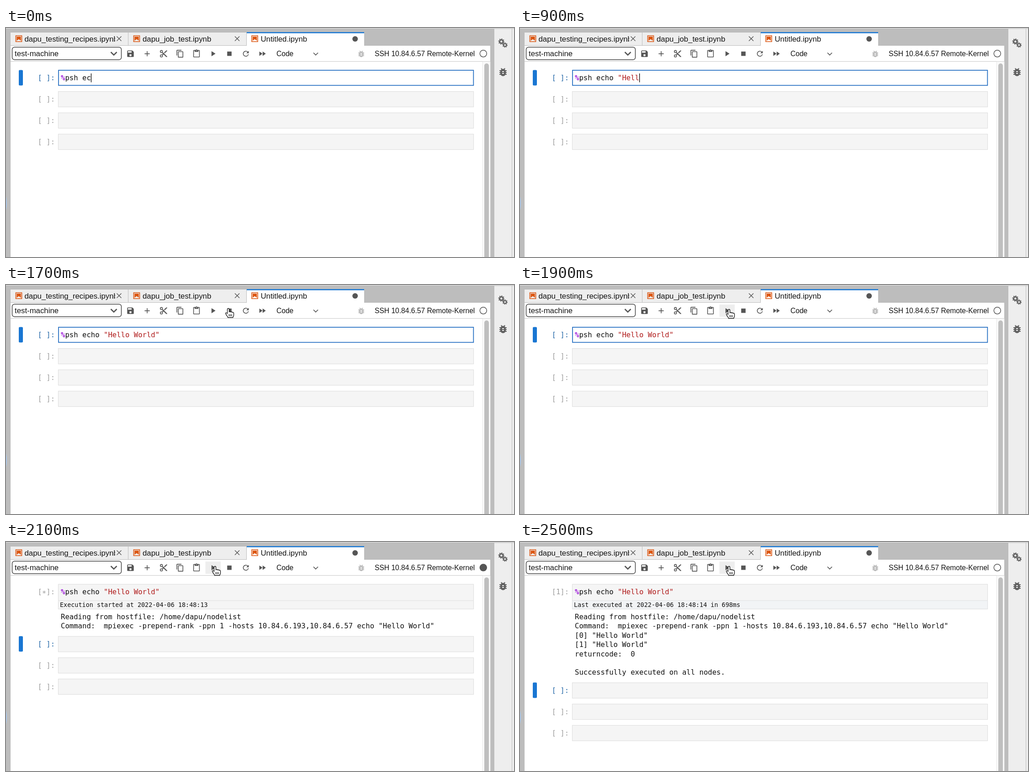
An HTML page for the animation above (2.78 s loop, 1112 by 504 pixels).

```html
<!DOCTYPE html>
<html lang="en">
<head>
<meta charset="utf-8">
<title>Notebook session</title>
<style>
  html, body { margin: 0; height: 100%; overflow: hidden; background: #fff; }
  svg { display: block; width: 100vw; height: 100vh; }
  text { font: 15.6px "Liberation Sans", Arial, sans-serif; fill: #141414; white-space: pre; }
  .tab { font-size: 16.8px; }
  .code { font: 15.62px "DejaVu Sans Mono", monospace; fill: #111; }
  .note { font: 13.44px "DejaVu Sans Mono", monospace; fill: #111; }
  .line { fill: none; stroke: #555; }
</style>
</head>
<body>
<svg viewBox="0 0 1112 504">
  <defs>
    <clipPath id="title"><path d="M0 0H239V40H0z"/></clipPath>
    <g id="book">
      <path d="M-6.5-6.5H6.5V6.5H-6.5z" fill="none" stroke="#dc5510" stroke-width="1.6"/>
      <path d="M-4.6-4.6H4.6V4.6L0 1-4.6 4.6z" fill="#dc5510"/>
    </g>
    <path id="close" class="line" stroke-width="1.4" d="M-5-5 5 5M5-5-5 5"/>
    <g id="bug">
      <path stroke="none" fill-rule="evenodd" d="M6 11a6 6 0 0 1 12 0v4a6 6 0 0 1-12 0zM10 10v2h4v-2zM10 14v2h4v-2z"/>
      <path fill="none" stroke-width="2" d="M4 9h5M15 9h5M4 13h5M15 13h5M4 17h5M15 17h5M7.7 3.7 10 6M16.3 3.7 14 6"/>
    </g>
    <g id="gear" fill="none" stroke="#616161">
      <circle r="3.7" stroke-width="2.8"/>
      <circle r="5.7" stroke-width="2.2" pathLength="16" stroke-dasharray="1"/>
    </g>
  </defs>

  <!-- window frame and tabs -->
  <path fill="#bdbdbd" d="M0 1H1112V504H0z"/>
  <path fill="#e6e6e6" d="M0 0H1112V1H0z"/>
  <path fill="#eee" d="M10 10H267V38H10zM268 10H526V38H268zM1069 2H1107V504H1069zM1108 2H1112V504H1108z"/>
  <path fill="#fff" d="M527 10H784V39H1060V504H10V39H527z"/>
  <path fill="#1976d2" d="M527 9H784V11.5H527z"/>
  <ellipse cx="-1" cy="386" rx="3" ry="15" fill="#a9c6e8"/>
  <use href="#book" x="28" y="23.5"/>
  <use href="#book" x="286" y="23.5"/>
  <use href="#book" x="544.5" y="23.5"/>
  <text class="tab" x="40.5" y="29.5" clip-path="url(#title)">dapu_testing_recipes.ipynb</text>
  <text class="tab" x="299" y="29.5">dapu_job_test.ipynb</text>
  <text class="tab" x="557.5" y="29.5">Untitled.ipynb</text>
  <use href="#close" x="247.5" y="23.5"/>
  <use href="#close" x="506" y="23.5"/>
  <circle cx="764.2" cy="24" r="6" fill="#555"/>

  <!-- toolbar -->
  <path stroke="#c8c8c8" d="M10 73.5H1060"/>
  <path id="hover" fill="#eee" d="M436.5 43H470V70H436.5z"/>
  <rect x="13.5" y="42.3" width="239" height="27.4" rx="5" fill="#fff" stroke="#444" stroke-width="1.5"/>
  <text class="tab" x="19" y="62">test-machine</text>
  <path class="line" stroke-width="2.6" d="M229.5 53 236 59.5 242.5 53"/>
  <g id="tools" fill="#555"></g>
  <text x="592" y="62">Code</text>
  <path class="line" stroke-width="1.7" d="M673 54.5 678 59.5 683 54.5"/>
  <use href="#bug" transform="translate(768 47.4) scale(.8)" fill="#bdbdbd" stroke="#bdbdbd"/>
  <text x="807" y="62">SSH 10.84.6.57 Remote-Kernel</text>
  <circle id="kernel" cx="1044.8" cy="56.3" r="7.5" stroke="#555" stroke-width="1.5"/>

  <!-- side panel and scrollbar -->
  <use href="#gear" x="1084.3" y="29.8"/>
  <use href="#gear" transform="translate(1092.3 37.5) scale(.85)"/>
  <use href="#bug" transform="translate(1076 85)" fill="#616161" stroke="#616161"/>
  <path fill="#fafafa" stroke="#e8e8e8" d="M1043 74H1060V505H1043z"/>
  <rect x="1047" y="78" width="10" height="440" rx="5" fill="#bfbfbf"/>

  <g id="cells"></g>
  <g id="hand" stroke="#111" stroke-width="1.3" stroke-linejoin="round">
    <path fill="#fff" d="M-2 2a2 2 0 0 1 4 0v6c0-1.6 3.4-1.6 3.6.4c.4-1.3 3-1.2 3.4.6c.6-1 3-.6 3 1.4v4.6c0 2-1.6 2.8-1.6 5H-1c-.2-2.2-2.4-4-3.6-6.4c-.9-1.6-1.8-2.4-1.2-3.4c.8-1.2 2.6-.4 3.8 1.2z"/>
    <path d="M1.8 13v4M4.6 13v4M7.4 13v4"/>
  </g>
</svg>
<script>
const $ = id => document.getElementById(id);
const LOOP = 2780, BLUE = '#1976d2';
const COMMAND = '%psh echo "Hello World"';
const KEY_TIMES = [100, 300, 400, 500, 600, 700, 800, 900, 1000, 1100, 1200, 1200, 1300, 1400, 1400, 1500];
const OUTPUT = [
  'Reading from hostfile: /home/dapu/nodelist',
  'Command:  mpiexec -prepend-rank -ppn 1 -hosts 10.84.6.193,10.84.6.57 echo "Hello World"',
  '[0] "Hello World"', '[1] "Hello World"', 'returncode:  0', '', 'Successfully executed on all nodes.'
];

// Toolbar icons: centre x, view box size, path
const TOOLS = [
  [272.5, 24, 'M17 3H5a2 2 0 0 0-2 2v14a2 2 0 0 0 2 2h14a2 2 0 0 0 2-2V7zM12 19a3 3 0 0 1 0-6 3 3 0 0 1 0 6zM15 9H5V5h10z'],
  [309, 24, 'M19 13h-6v6h-2v-6H5v-2h6V5h2v6h6z'],
  [345, 24, 'M6 2a4 4 0 0 0 0 8 4 4 0 0 0 0-8zM6 4a2 2 0 0 1 0 4 2 2 0 0 1 0-4zM6 14a4 4 0 0 0 0 8 4 4 0 0 0 0-8zM6 16a2 2 0 0 1 0 4 2 2 0 0 1 0-4zM7.6 9.6 19 21h3v-1L9.6 7.6zM19 3l-6 6 2 2 7-7V3zM10 12l-2.4 2.4 2 2L12 14z'],
  [381, 18, 'M11.9 1H3.2a1.5 1.5 0 0 0-1.5 1.5v10.2h1.5V2.5h8.7zM14.1 3.9h-8a1.5 1.5 0 0 0-1.5 1.5v10.2a1.5 1.5 0 0 0 1.5 1.5h8a1.5 1.5 0 0 0 1.5-1.5V5.4a1.5 1.5 0 0 0-1.5-1.5zM14.1 15.5h-8V5.4h8z'],
  [417, 24, 'M19 2h-4.18a3 3 0 0 0-5.64 0H5a2 2 0 0 0-2 2v16a2 2 0 0 0 2 2h14a2 2 0 0 0 2-2V4a2 2 0 0 0-2-2zM12 2a1 1 0 0 1 0 2 1 1 0 0 1 0-2zM19 20H5V4h2v3h10V4h2z'],
  [453, 24, 'M8 5v14l11-7z'],
  [489, 24, 'M6 6h12v12H6z'],
  [525, 18, 'M9 13.5a4.5 4.5 0 1 1 3.17-7.67L10 8h5V3l-1.76 1.76A6 6 0 1 0 14.9 10h-1.52A4.5 4.5 0 0 1 9 13.5z'],
  [561, 24, 'M4 18l8.5-6L4 6zM13 6v12l8.5-6z']
];
$('tools').innerHTML = TOOLS.map(([x, size, d]) =>
  `<path fill-rule="evenodd" transform="translate(${x - 9.6} 47) scale(${19.2 / size})" d="${d}"/>`).join('');

const box = (x, y, w, h, style) => `<rect x="${x}" y="${y}" width="${w}" height="${h}" ${style}/>`;
const text = (x, y, s, cls = 'code', fill = '') =>
  `<text class="${cls}" x="${x}" y="${y}"${fill && ` style="fill:${fill}"`}>${s}</text>`;

function cell(y, mark, selected, editing = false, height = 34) {
  return (selected ? box(28, y - .5, 9, 34, `rx="2" fill="${BLUE}"`) : '') +
    text(69.5, y + 22, `[${mark}]:`, 'code', selected ? '#2468a8' : '#9e9e9e') +
    (editing ? box(115, y, 908.3, 33.3, 'fill="#fff" stroke="#2d74c4" stroke-width="1.8"')
             : box(114.5, y, 909, height, 'fill="#f5f5f5" stroke="#e0e0e0" stroke-width="1.2"'));
}

function command(typed) {
  const quote = COMMAND.indexOf('"');
  return text(120, 115, '<tspan font-weight="bold" style="fill:#9a12d8">%</tspan>' +
    typed.slice(1, quote) + `<tspan style="fill:#b01c1c">${typed.slice(quote)}</tspan>`);
}

function notebook(t) {
  const ran = t >= 2000, started = t >= 2100, done = t >= 2300;
  const count = 7 + KEY_TIMES.filter(k => k <= t).length;
  const shift = done ? 170 : started ? 68 : 0;
  let out = cell(93, done ? 1 : ran ? '∗' : ' ', !ran, !ran, started ? 54.5 : 34);
  out += command(COMMAND.slice(0, count));
  if (t < 1700) out += box(120 + count * 9.4, 100, 1.3, 19.5, 'fill="#000"');
  if (started) {
    const glow = !done ? 0 : t < 2400 ? 1 : t < 2500 ? .5 : .08;
    out += box(114.5, 128.5, 909, 1, 'fill="#e0e0e0"') +
      box(114, 128.5, 910, 19, `fill="#c7e2fb" opacity="${glow}"`) +
      text(118, 143, done ? 'Last executed at 2022-04-06 18:48:14 in 698ms'
                          : 'Execution started at 2022-04-06 18:48:13', 'note');
    out += OUTPUT.slice(0, done ? 7 : 2).map((s, i) => text(120, 170 + i * 20.4, s)).join('');
  }
  for (let i = 0; i < 3; i++) out += cell(139.7 + i * 46.9 + shift, ' ', ran && i === 0);
  return out;
}

let shown = -1;
function draw() {
  const t = Math.floor(performance.now() % LOOP / 100) * 100;
  if (t !== shown) {
    shown = t;
    const move = Math.min(1, Math.max(0, (t - 1700) / 200));
    $('cells').innerHTML = notebook(t);
    $('kernel').setAttribute('fill', t >= 2100 && t < 2300 ? '#555' : '#fff');
    $('hover').style.display = t >= 1800 ? '' : 'none';
    $('hand').style.display = t >= 1700 ? '' : 'none';
    $('hand').setAttribute('transform', `translate(${486.5 - 29 * move} ${51.5 + 2 * move})`);
  }
  requestAnimationFrame(draw);
}
draw();
</script>
</body>
</html>
```
